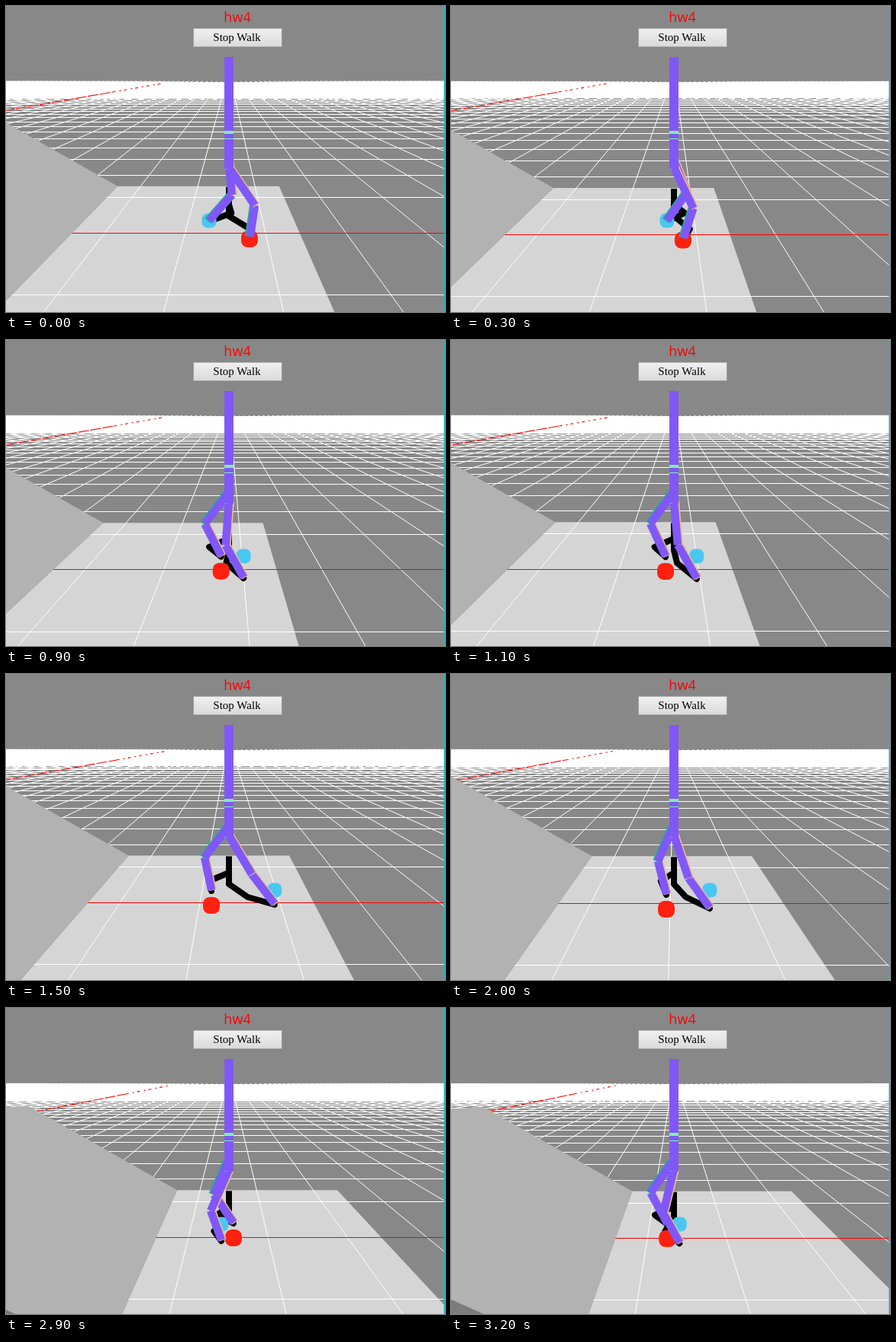
These frames come from a looping animation (577 by 402 pixels, 3300 ms). An HTML page with a canvas:

```html
<!DOCTYPE html>
<html lang="en">
<head>
<meta charset="utf-8">
<title>hw4</title>
<style>
html, body { margin: 0; width: 100%; height: 100%; overflow: hidden; background: #888; }
canvas { position: absolute; left: 0; top: 0; }
h1 { position: absolute; left: 254px; top: 2px; width: 100px; margin: 0; text-align: center;
  font: 400 18px/24px "Open Sans", "Noto Sans", sans-serif; color: #f00; }
button { position: absolute; left: 246px; top: 29px; width: 117px; height: 25px; padding: 0 2px 0 0;
  box-sizing: border-box; border: 1px solid #aaa; border-radius: 0; color: #000;
  background: linear-gradient(#f0f0f0, #dadada); font: 15px "Liberation Serif", serif; }
</style>
</head>
<body>
<canvas id="stage" width="577" height="402"></canvas>
<h1>hw4</h1>
<button>Stop Walk</button>
<script>
const c = document.getElementById('stage').getContext('2d');
const LOOP = 3300, STEP = 100, GAIT = 2550, TURN = 700;
const CX = 293, HORIZON = 86.5, FAR = 100;
const PURPLE = '#8058f8', TEAL = '#20b090', PEACH = '#f0b890';

// Position of the ramp's foot relative to the walker: [time, x]
const path = [[0, -1.95], [700, -2.36], [1100, -2.094], [1500, -1.768],
  [2000, -1.452], [2500, -1.146], [3200, -.741], [3300, -.68]];

// Gait: time, bob, then x,y of near knee, near foot, far knee, far foot (x counts forward)
const gait = [
  [0, 0, 34, 262, 28, 303, 4, 248, -26, 282],
  [625, 4.5, 15, 269, -6, 308, 30, 243, 8, 283],
  [1100, 3, -5, 269, -30, 313, 31, 241, 11, 284],
  [1500, 2, -30, 263, -60, 302, 32, 241, 23, 284],
  [2000, 3, -19, 268, -47, 307, 21, 246, 10, 289],
  [2500, -1, 34, 262, 19, 309, 6, 250, -21, 287]
];

function along(t) {
  let i = 1;
  while (path[i][0] < t) i++;
  const [a, x] = path[i - 1], [b, y] = path[i];
  return x + (y - x) * (t - a) / (b - a);
}

// Cyclic cubic interpolation through the gait keys
function pose(t) {
  const n = gait.length;
  const key = i => {
    const turns = Math.floor(i / n), k = gait[i - turns * n];
    return [k[0] + turns * GAIT, ...k.slice(1)];
  };
  t %= GAIT;
  let i = 0;
  while (key(i + 1)[0] <= t) i++;
  const [p, a, b, q] = [key(i - 1), key(i), key(i + 1), key(i + 2)];
  const h = b[0] - a[0], s = (t - a[0]) / h;
  return a.slice(1).map((_, j) => {
    j++;
    const m0 = (b[j] - p[j]) / (b[0] - p[0]) * h, m1 = (q[j] - a[j]) / (q[0] - a[0]) * h;
    return a[j] + s * (m0 + s * (3 * (b[j] - a[j]) - 2 * m0 - m1 + s * (2 * (a[j] - b[j]) + m0 + m1)));
  });
}

function line(pts, color, width = 1, dash = []) {
  c.strokeStyle = color;
  c.lineWidth = width;
  c.setLineDash(dash);
  c.beginPath();
  pts.forEach(p => c.lineTo(...p));
  c.stroke();
}

function fill(pts, color) {
  c.fillStyle = color;
  c.beginPath();
  pts.forEach(p => c.lineTo(...p));
  c.fill();
}

function rect(x, y, w, h, color) {
  c.fillStyle = color;
  c.fillRect(x, y, w, h);
}

function ball(x, y, r, color) {
  c.fillStyle = color;
  c.beginPath();
  c.roundRect(x - r, y - r, 2 * r, 2 * r, r * .8);
  c.fill();
}

function floor(base, bob) {
  const project = (x, n) => {
    const z = 3.597 + n + bob * .015;
    return [CX + 380 * x / z, HORIZON + 760.8 * (1 + bob * .009) / z];
  };
  const back = 1.47, front = -1.52, edge = base + 2.83, far = 58;

  fill([project(base, back), project(edge, back), project(edge, front), project(base, front)], '#d5d5d5');

  for (let i = -60; i <= 60; i++) {
    const x = base + .405 + i;
    line([project(x, -1.9), project(x, far)], '#fff');
  }
  for (let n = -1; n < 24; n++) {
    rect(0, Math.floor(project(0, n)[1]), 577, 1, n ? '#fff' : '#f00');
  }
  rect(0, FAR, 577, 21, '#fff');
  line([[0, 122], [577, 122]], '#fff', 2, [5, 11]);

  const axis = base - 9.595, [ax, ay] = project(axis, 0), slope = (ax - CX) / (ay - HORIZON);
  const onAxis = y => [CX + slope * (y - HORIZON), y];
  line([onAxis(146), onAxis(113)], '#f00', 1.1, [14, 2]);
  line([onAxis(113), onAxis(101.5)], '#f00', 1.1, [4, 5, 2, 4]);

  // Ramp rising to the left, with its shaded side
  const [bx, by] = project(base, back), [fx, fy] = project(base, front);
  const low = [fx - 400, fy - 180];
  fill([[bx, by], [bx - 196, by - 111], [bx - 400, by - 97], low, [fx, fy]], '#b2b2b2');
  fill([[fx, fy], low, [fx - 400, fy]], '#7c7c7c');
  return by;
}

function walker(p, right, top) {
  const dir = right ? 1 : -1;
  const at = i => [CX + dir * p[i], p[i + 1]];
  const [nearKnee, nearFoot, farKnee, farFoot] = [1, 3, 5, 7].map(at);
  const shade = knee => CX + (knee[0] - CX) * .82;

  c.lineCap = c.lineJoin = 'round';
  line([[CX, 261], [shade(farKnee), 272], [farFoot[0], farFoot[1] + 1]], '#000', 8);
  line([[CX, 276], [shade(nearKnee), 293], [nearFoot[0], nearFoot[1] + 1]], '#000', 8);
  c.lineCap = 'butt';
  rect(289, top + 1, 8, 276 - top, '#000');

  const red = right ? [nearFoot[0] - 1, nearFoot[1] + 3] : [farFoot[0], farFoot[1] + 20];
  const blue = right ? farFoot : [nearFoot[0], 284];
  ball(...blue, 9.5, '#48c8f0');
  ball(...red, 11, '#ff2010');

  const bone = (a, b, teal) => {
    const dx = teal ? -2 : 2;
    line([[a[0] + dx, a[1]], [b[0] + dx, b[1]]], teal ? TEAL : PEACH, 10);
    line([a, b], PURPLE, 10.5);
  };
  bone(farKnee, farFoot, right);
  bone([CX - 1, 201], farKnee, !right);
  bone(nearKnee, nearFoot, right);
  bone([CX, 212], nearKnee, false);

  rect(287, 67, 12, 148, PURPLE);
  rect(287, 164, 12, 4, '#80f0b0');
  rect(287, 174, 12, 1, '#80f0b0');
  rect(287, 214, 4, 1, '#40c8a0');
}

function draw(now) {
  const t = Math.floor(now % LOOP / STEP) * STEP;
  const p = pose(t);
  rect(0, 0, 577, 402, '#888');
  c.lineCap = 'butt';
  const top = floor(along(t), p[0]);
  walker(p, t < TURN, top);
  rect(575.5, 0, 1.5, 402, '#20b8c8');
  requestAnimationFrame(draw);
}
requestAnimationFrame(draw);
</script>
</body>
</html>
```
